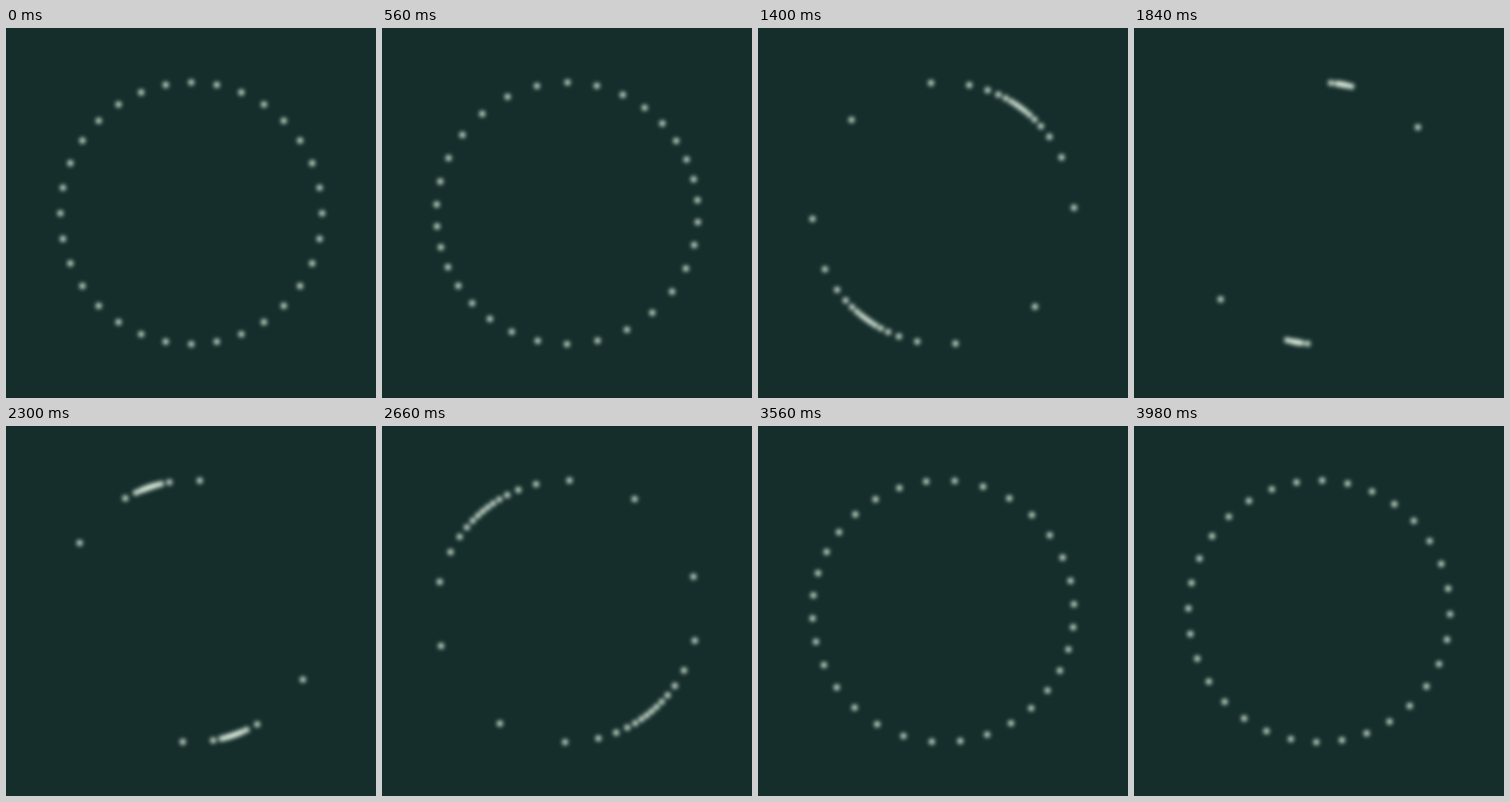
An HTML page with a canvas for the animation above (4 s loop, 540 by 540 pixels).

```html
<!DOCTYPE html>
<html lang="en">
<head>
<meta charset="utf-8">
<title>Turning ring of dots</title>
<style>
  html, body { margin: 0; width: 100%; height: 100%; overflow: hidden; background: #152e2c; }
  canvas { display: block; width: 540px; height: 540px; filter: blur(3.1px); }
</style>
</head>
<body>
<canvas id="stage" width="540" height="540"></canvas>
<script>
const ctx = document.getElementById('stage').getContext('2d');
const LOOP = 4000, STEP = 20;
const COUNT = 32, CENTER = 270.4, RING = 191, DOT = 4.2;

// Turn a flat direction about the axis (1, 0, 1), then flatten it again.
function turn(x, y, angle) {
  const c = Math.cos(angle), s = Math.sin(angle) * Math.SQRT1_2;
  return [x * (1 + c) / 2 - y * s, x * s + y * c];
}

function draw(time) {
  const angle = -2 * Math.PI * time / LOOP;
  ctx.clearRect(0, 0, 540, 540);
  ctx.fillStyle = 'rgb(228, 244, 228)';
  ctx.beginPath();
  for (let i = 0; i < COUNT; i++) {
    const a = 2 * Math.PI * i / COUNT;
    const [dx, dy] = turn(Math.sin(a), -Math.cos(a), angle);
    // Every dot is pushed back out to the ring.
    const scale = RING / (Math.hypot(dx, dy) || 1);
    const x = CENTER + dx * scale, y = CENTER + dy * scale;
    ctx.moveTo(x + DOT, y);
    ctx.arc(x, y, DOT, 0, 2 * Math.PI);
  }
  ctx.fill();
}

const start = performance.now();
function frame() {
  const time = (performance.now() - start) % LOOP;
  draw(Math.floor(time / STEP) * STEP);
  requestAnimationFrame(frame);
}
frame();
</script>
</body>
</html>
```
